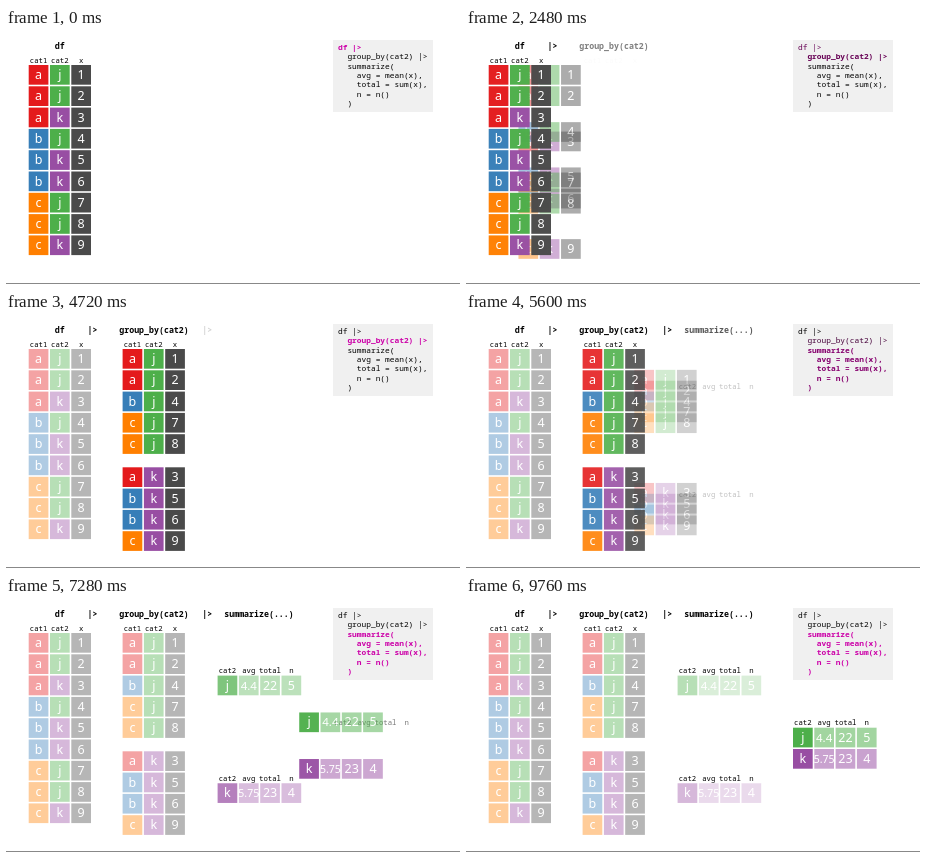
An HTML page with a canvas that plays this animation: 454x256 px, repeating every 10000 ms.

```html
<!DOCTYPE html>
<html lang="en">
<head>
<meta charset="utf-8">
<title>group_by and summarize</title>
<style>
  html, body { margin: 0; width: 100%; height: 100%; overflow: hidden; background: #fff; }
  canvas { display: block; width: 454px; height: 256px; }
</style>
</head>
<body>
<canvas id="stage"></canvas>
<script>
const W = 454, H = 256, LOOP = 10000, STEP = 80, MOVE = 1135;
const PITCH = 21.3, SIZE = 19.7;
const MONO = '"Noto Sans Mono", "DejaVu Sans Mono", monospace';
const SANS = '"Noto Sans", "Open Sans", sans-serif';
const INK = '#000', ACCENT = [204, 0, 168];
const FILL = {
  a: 0xe41a1c, b: 0x377eb8, c: 0xff7f00, j: 0x4daf4a, k: 0x984ea3, x: 0x4a4a4a
};

const canvas = document.getElementById('stage');
const ctx = canvas.getContext('2d');
const scale = window.devicePixelRatio || 1;
canvas.width = W * scale;
canvas.height = H * scale;

const clamp = v => Math.max(0, Math.min(1, v));
const lerp = (a, b, p) => a + (b - a) * p;
const smooth = v => { v = clamp(v); return v * v * (3 - 2 * v); };
const swing = s => (1 - Math.cos(Math.PI * s)) / 2;
const dimmed = s => 1 - 0.6 * smooth((s - 0.3) / 0.7);
const headerFade = s => clamp((s - 0.37) / 0.5);
const hex = n => '#' + n.toString(16).padStart(6, '0');

const TOP = 37, LEFT = 22.7, GROUPED = 116.6, SUMMARY = 211.6, RESULT = 327;
const K_TOP = 155.3;

// Each row knows its place in the plain table and in the grouped one.
const seen = { j: 0, k: 0 };
const rows = [...'jjkjkkjjk'].map((key, i) => ({
  cells: ['aaabbbccc'[i], key, String(i + 1)],
  key,
  y: TOP + i * PITCH,
  groupY: (key === 'j' ? TOP : K_TOP) + seen[key]++ * PITCH
}));
const groups = [
  { key: 'j', values: ['j', '4.4', '22', '5'], y: TOP + 2 * PITCH, endY: 131.7 },
  { key: 'k', values: ['k', '5.75', '23', '4'], y: K_TOP + 1.5 * PITCH, endY: 153 }
];

function text(str, x, y, { size = 8.28, bold = true, color = INK, alpha = 1, align = 'center', family = MONO } = {}) {
  if (alpha <= 0) return;
  ctx.globalAlpha = alpha;
  ctx.font = `${bold ? 'bold ' : ''}${size}px ${family}`;
  ctx.textAlign = align;
  ctx.fillStyle = color;
  ctx.fillText(str, x, y);
}

// Adding the complement of the fill makes box and white label fade as one.
function cell(label, x, y, color, alpha) {
  ctx.globalAlpha = alpha;
  ctx.fillStyle = hex(color);
  ctx.fillRect(x, y, SIZE, SIZE);
  ctx.globalCompositeOperation = 'lighter';
  const size = label.length > 3 ? 10.5 : label.length > 2 ? 11.5 : 12.5;
  text(label, x + SIZE / 2, y + 14, {
    size, bold: false, color: hex(0xffffff - color), alpha, family: SANS
  });
  ctx.globalCompositeOperation = 'source-over';
}

function dataRow(row, x, y, alpha) {
  if (alpha <= 0) return;
  row.cells.forEach((v, i) => cell(v, x + i * PITCH, y, FILL[v] || FILL.x, alpha));
}

function summaryRow(group, x, y, alpha) {
  if (alpha <= 0) return;
  group.values.forEach((v, i) =>
    cell(v, x + i * PITCH, y, FILL[group.key], alpha * (i ? 0.52 : 1)));
}

function header(names, x, top, alpha = 1) {
  names.split(' ').forEach((name, i) =>
    text(name, x + i * PITCH + SIZE / 2, top - 2.3, { size: 7.3, bold: false, alpha }));
}

const code = [
  ['df |>', 0], ['  group_by(cat2) |>', 1], ['  summarize(', 2], ['    avg = mean(x),', 2],
  ['    total = sum(x),', 2], ['    n = n()', 2], ['  )', 2]
];

function codePanel(emphasis) {
  ctx.globalAlpha = 1;
  ctx.fillStyle = '#f0f0f0';
  ctx.fillRect(327, 12, 100, 72);
  code.forEach(([line, part], i) => {
    const e = emphasis[part];
    const color = `rgb(${ACCENT.map(v => Math.round(v * e)).join()})`;
    text(line, 332, 22 + i * 9.35, { size: 7.85, align: 'left', bold: e > 0.5, color });
  });
}

function draw(t) {
  const progress = start => clamp((t - start) / MOVE);
  const pipe = start => smooth((t - start) / 450);
  const s1 = progress(2048), s2 = progress(5040), s3 = progress(6558);
  const p1 = swing(s1), p2 = swing(s2), p3 = swing(s3);
  const show1 = clamp(s1 * 1.33), show2 = clamp(s2 * 1.33);

  ctx.setTransform(scale, 0, 0, scale, 0, 0);
  ctx.globalAlpha = 1;
  ctx.fillStyle = '#fff';
  ctx.fillRect(0, 0, W, H);
  ctx.fillStyle = '#888';
  ctx.fillRect(0, 255, W, 1);

  codePanel([1 - show1, show1 * (1 - show2), show2]);

  text('df', 53.7, 21);
  text('|>', 86.5, 21, { alpha: pipe(1600) });
  text('group_by(cat2)', 148, 21, { alpha: show1 });
  text('|>', 201.3, 21, { alpha: pipe(4600) });
  text('summarize(...)', 253, 21, { alpha: show2 });

  // Copies of each group collapse towards their summary row, below the table they leave.
  rows.forEach(r => {
    const target = groups.find(g => g.key === r.key).y;
    dataRow(r, lerp(GROUPED, SUMMARY + PITCH / 2, p2), lerp(r.groupY, target, p2), s2 * (1 - s2));
  });

  const groupAlpha = clamp(s1 * 1.2) * dimmed(s2);
  rows.forEach(r => dataRow(r, lerp(LEFT, GROUPED, p1), lerp(r.y, r.groupY, p1), groupAlpha));
  rows.forEach(r => dataRow(r, LEFT, r.y, dimmed(s1)));
  header('cat1 cat2 x', LEFT, TOP);
  header('cat1 cat2 x', GROUPED, TOP, headerFade(s1));

  groups.forEach(g => {
    header('cat2 avg total n', SUMMARY, g.y, headerFade(s2));
    summaryRow(g, SUMMARY, g.y, clamp((s2 - 0.55) / 0.4) * dimmed(s3));
  });

  header('cat2 avg total n', RESULT, groups[0].endY, headerFade(s3));
  groups.forEach(g =>
    summaryRow(g, lerp(SUMMARY, RESULT, p3), lerp(g.y, g.endY, p3), clamp(s3 * 1.5)));
}

const origin = performance.now();
function tick() {
  const t = (performance.now() - origin) % LOOP;
  draw(Math.floor(t / STEP) * STEP);
  requestAnimationFrame(tick);
}
tick();
</script>
</body>
</html>
```
